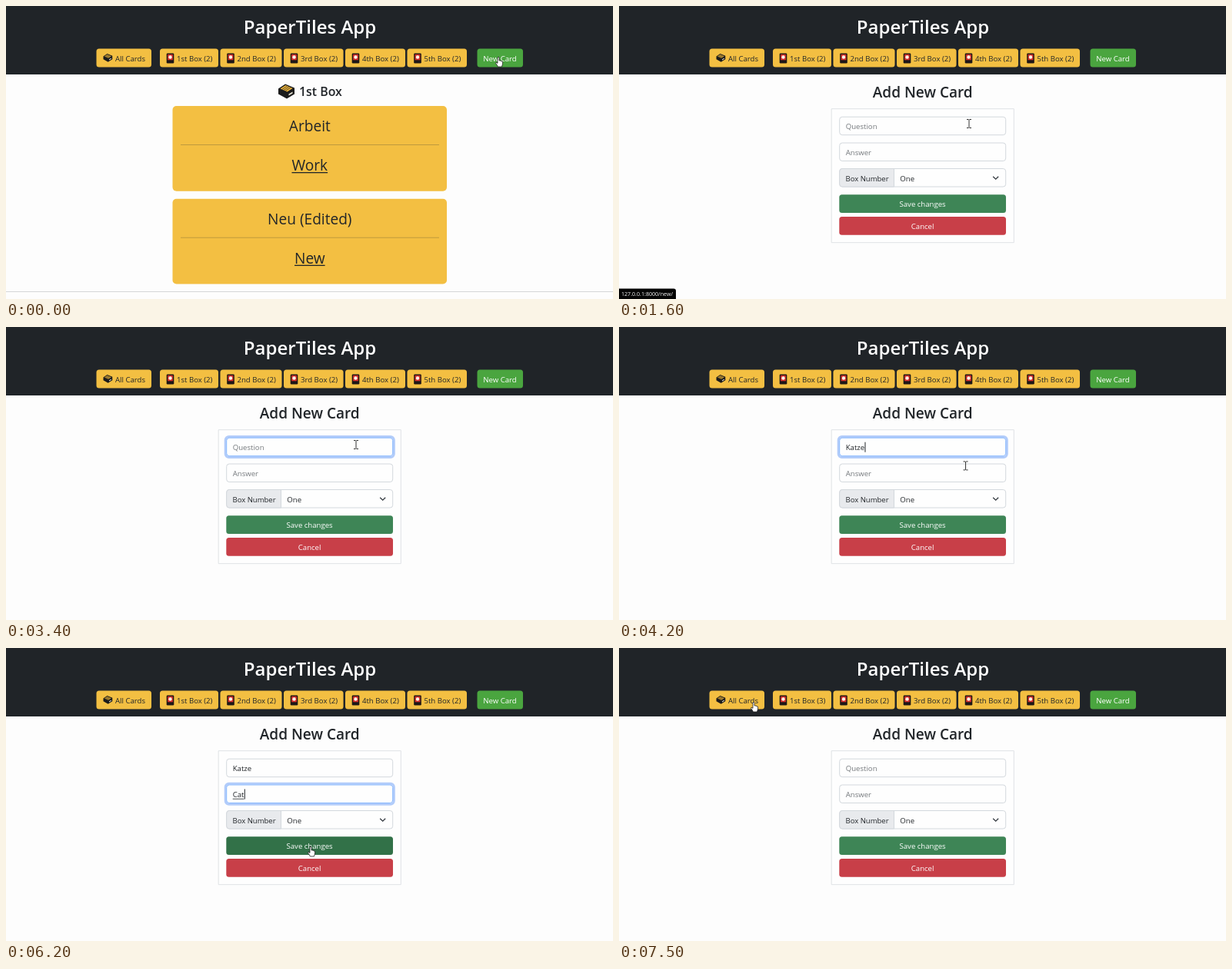
Write an HTML page with a canvas that moves like this. It is 789 px wide and 381 px high and loops after 8000 ms.

```html
<!DOCTYPE html>
<html lang="en">
<head>
<meta charset="utf-8">
<title>PaperTiles App</title>
<style>
html, body { margin: 0; width: 100%; height: 100%; overflow: hidden; background: #fdfdfd; }
canvas { display: block; width: 789px; height: 381px; }
</style>
</head>
<body>
<canvas id="stage"></canvas>
<script>
const W = 789, H = 381, LOOP = 8000, STEP = 100;
const canvas = document.getElementById('stage');
const dpr = window.devicePixelRatio || 1;
canvas.width = W * dpr;
canvas.height = H * dpr;
const c = canvas.getContext('2d');
c.scale(dpr, dpr);

const INK = '#212529', YELLOW = '#f3bf42', GREY = '#75797d', LINE = '#d3d8dd';
const SIZE = 9.6;

// Times of the events on screen
const CLICK_NEW = 1000, FORM = 1600, STATUS_OFF = 2000;
const FOCUS_Q = 2900, FOCUS_A = 4400, UNDERLINE = 5200;
const HOVER_SAVE = 6100, CLICK_SAVE = 6300, SAVED = 6500;
const KEYS_Q = [3500, 3600, 3700, 3800, 4000];
const KEYS_A = [4800, 4900, 5000];

// Pointer stops: time, x, y
const STOPS = [
  [0, 640, 66], [1000, 640, 66], [1500, 455, 153], [4000, 455, 153],
  [4300, 449, 190], [4500, 449, 190], [4800, 430, 208], [5800, 430, 208],
  [6200, 396, 258], [6600, 396, 258], [7100, 184, 76], [7200, 184, 76],
  [7500, 175, 70], [8000, 175, 70]
];

const clamp = v => Math.max(0, Math.min(1, v));
const ease = v => v * v * (3 - 2 * v);
const mix = (a, b, k) => a.map((v, i) => Math.round(v + (b[i] - v) * k));
const rgb = v => `rgb(${v})`;
const inside = (p, x, y, r, b) => p.x >= x && p.x <= r && p.y >= y && p.y <= b;

function text(s, x, y, { size = SIZE, color = INK, align = 'left', weight = 400 } = {}) {
  c.font = `${weight} ${size}px "Open Sans", "Noto Sans", sans-serif`;
  c.fillStyle = color;
  c.textAlign = align;
  c.fillText(s, x, y);
  return c.measureText(s).width;
}

function box(x, y, r, b, radius, fill, stroke, width = 1) {
  c.beginPath();
  c.roundRect(x, y, r - x, b - y, radius);
  if (fill) { c.fillStyle = fill; c.fill(); }
  if (stroke) { c.strokeStyle = stroke; c.lineWidth = width; c.stroke(); }
}

function rect(x, y, w, h, fill) {
  c.fillStyle = fill;
  c.fillRect(x, y, w, h);
}

function poly(points, fill, stroke, width = 0.8) {
  c.beginPath();
  for (let i = 0; i < points.length; i += 2) c.lineTo(points[i], points[i + 1]);
  c.closePath();
  if (fill) { c.fillStyle = fill; c.fill(); }
  if (stroke) { c.strokeStyle = stroke; c.lineWidth = width; c.lineJoin = 'round'; c.stroke(); }
}

function at(x, y, scale, draw) {
  c.save();
  c.translate(x, y);
  c.scale(scale, scale);
  draw();
  c.restore();
}

// Card file box, 22 units wide
function fileBox(lid) {
  poly([0, 7, 9, 1, 21, 6, 21, 14, 11, 20, 0, 14], '#1b1b1b');
  poly([2.5, 7, 9.5, 2.5, 18.5, 6.5, 11.5, 11], lid);
  c.strokeStyle = '#1b1b1b';
  c.lineWidth = 0.7;
  for (let i = 1; i < 4; i++) {
    c.beginPath();
    c.moveTo(2.5 + i * 2.2, 7 + i);
    c.lineTo(9.5 + i * 2.2, 2.5 + i);
    c.stroke();
  }
  poly([13.5, 14, 18.5, 11, 18.5, 13, 13.5, 16], '#e9e4d6');
}

function playingCard(x, y) {
  box(x, y, x + 9.6, y + 13, 1.2, '#1d1717');
  rect(x + 1.4, y + 1.4, 6.8, 7.4, '#d62f2b');
  c.beginPath();
  c.arc(x + 4.8, y + 5, 2.2, 0, 7);
  c.fillStyle = '#fbf3e8';
  c.fill();
}

function header(t) {
  rect(0, 0, W, 89, '#202428');
  text('PaperTiles App', 395, 36, { size: 24, color: '#fff', align: 'center', weight: 600 });
  box(117.5, 55.5, 189, 79.5, 3.5, YELLOW);
  at(126.5, 61.5, 0.56, () => fileBox('#c99b35'));
  text('All Cards', 142, 71.5);
  const tabs = [[200, 276], [278.5, 358.5], [361, 438.5], [441, 519], [521.5, 599]];
  tabs.forEach(([x, r], i) => {
    box(x, 55.5, r, 79.5, 3.5, YELLOW);
    playingCard(x + 8.7, 61.5);
    const n = i === 0 && t >= SAVED ? 3 : 2;
    text(`${['1st', '2nd', '3rd', '4th', '5th'][i]} Box (${n})`, x + 22, 71.5);
  });
  const ring = t >= CLICK_NEW && t < FORM;
  box(612.5, 55.5, 672, 79.5, 3.5, '#4aa53f');
  if (ring) box(613, 56, 671.5, 79, 3.5, null, '#e4f2e2');
  text('New Card', 642, 71.5, { color: '#fff', align: 'center' });
}

function flashCard(y, question, answer) {
  box(216.5, y, 573, y + 110.8, 5, YELLOW);
  text(question, 394.8, y + 33.3, { size: 19.1, align: 'center' });
  rect(227, y + 50, 336, 1, '#bf9a3d');
  const w = text(answer, 394.8, y + 84, { size: 19.1, align: 'center' });
  rect(394.8 - w / 2, y + 86, w, 1.3, INK);
}

function listPage() {
  at(354, 100.5, 1, () => fileBox('#f0b73c'));
  text('1st Box', 381, 117, { size: 15.9, weight: 600 });
  flashCard(130, 'Arbeit', 'Work');
  flashCard(250.7, 'Neu (Edited)', 'New');
  rect(0, 371, W, 1, '#d5d6d7');
}

function field(y, hint, value, focus, caret, underlined) {
  if (focus > 0) box(285.2, y - 1.8, 504.3, y + 25.3, 4.5, null, `rgba(178,204,250,${focus})`, 3);
  const edge = rgb(mix([211, 216, 221], [134, 183, 254], focus));
  box(286.7, y, 502.7, y + 23.5, 3.5, '#fefefe', edge);
  const base = y + 16;
  const w = value ? text(value, 294.7, base) : 0;
  if (!value) text(hint, 294.7, base, { color: GREY });
  if (underlined) rect(294.7, base + 1.8, w, 0.8, INK);
  if (caret) rect(295 + w, y + 5.5, 1, 13, INK);
}

// The caret restarts its blink at every key
function caretOn(t, from, keys, to) {
  if (t < from || t >= to) return false;
  const last = keys.filter(k => k <= t).pop() ?? from;
  return (t - last) % 1000 < 500;
}

const typed = (word, keys, t) => word.slice(0, keys.filter(k => k <= t).length);
const fade = (t, on, off) => clamp((t - on + STEP) / 200) * (1 - clamp((t - off + STEP) / 200));

function formPage(t) {
  text('Add New Card', 394.7, 119, { size: 19.05, align: 'center', weight: 600 });
  box(276.2, 133.7, 513.3, 307.7, 0, '#fefefe', '#dfe2e5');
  const open = t < SAVED;
  field(144.2, 'Question', open ? typed('Katze', KEYS_Q, t) : '', fade(t, FOCUS_Q, FOCUS_A),
    caretOn(t, FOCUS_Q, KEYS_Q, FOCUS_A));
  field(178, 'Answer', open ? typed('Cat', KEYS_A, t) : '', fade(t, FOCUS_A, CLICK_SAVE),
    caretOn(t, FOCUS_A, KEYS_A, CLICK_SAVE), open && t >= UNDERLINE);

  box(286.7, 211.5, 502.7, 235, 3.5, '#fefefe', LINE);
  box(286.7, 211.5, 357.5, 235, [3.5, 0, 0, 3.5], '#e8eaed', LINE);
  text('Box Number', 294.5, 227.5, { size: 9.5 });
  text('One', 365.3, 227.5);
  c.beginPath();
  c.moveTo(486.2, 221.7);
  c.lineTo(489.7, 225.2);
  c.lineTo(493.2, 221.7);
  c.strokeStyle = '#343a40';
  c.lineWidth = 1.3;
  c.stroke();

  const hover = fade(t, HOVER_SAVE, 6700);
  if (t >= CLICK_SAVE && t < SAVED) box(285.5, 244, 504, 270, 4.5, null, '#aacdb6', 2.5);
  box(286.3, 245.2, 503, 269, 3.5, rgb(mix([62, 133, 86], [50, 113, 72], hover)));
  text('Save changes', 394.6, 261.2, { color: '#fff', align: 'center' });
  box(286.3, 274, 503, 297.8, 3.5, '#c83f48');
  text('Cancel', 394.6, 290, { color: '#fff', align: 'center' });
}

function status() {
  box(0, 367.5, 74, 382, [0, 3, 0, 0], '#050505');
  text('127.0.0.1:8000/new/', 3, 377.2, { size: 7.1, color: '#f4f4f4' });
}

function pointerAt(t) {
  const i = Math.max(1, STOPS.findIndex(s => s[0] > t));
  const [t0, x0, y0] = STOPS[i - 1], [t1, x1, y1] = STOPS[i];
  const k = ease(clamp((t - t0) / (t1 - t0)));
  return { x: x0 + (x1 - x0) * k, y: y0 + (y1 - y0) * k };
}

function hand() {
  poly([-1, 1, 0, 0, 1, 1, 1, 5, 3, 5, 4, 5.8, 5.2, 6, 5.6, 7.2, 5.4, 10, 4.4, 13,
    -0.6, 13, -1.6, 11, -3.6, 8.2, -3, 7.2, -1, 8.4], '#fff', '#222');
}

function arrow() {
  poly([0, 0, 0, 10.5, 2.4, 8.4, 4, 12, 5.6, 11.2, 4.1, 7.8, 7.2, 7.6], '#fff', '#333');
}

function beam() {
  rect(-0.5, -5.5, 1, 11, '#333');
  for (const y of [-6, 5]) {
    rect(-3, y, 2.4, 1, '#333');
    rect(0.6, y, 2.4, 1, '#333');
  }
}

function pointer(t) {
  const p = pointerAt(t), form = t >= FORM;
  const button = inside(p, 117, 55, 189, 79) || inside(p, 200, 55, 599, 79) ||
    inside(p, 612, 55, 672, 79) || (form && inside(p, 286, 245, 503, 298));
  const words = form
    ? inside(p, 286, 144, 503, 168) || inside(p, 286, 178, 503, 201)
    : inside(p, 227, 143, 563, 170);
  at(p.x, p.y, 1, button ? hand : words ? beam : arrow);
}

function draw(t) {
  rect(0, 0, W, H, '#fdfdfd');
  header(t);
  if (t < FORM) listPage();
  else formPage(t);
  if (t >= CLICK_NEW && t < STATUS_OFF) status();
  pointer(t);
}

const start = performance.now();
function tick() {
  const t = (performance.now() - start) % LOOP;
  draw(Math.floor(t / STEP) * STEP);
  requestAnimationFrame(tick);
}
tick();
</script>
</body>
</html>
```
